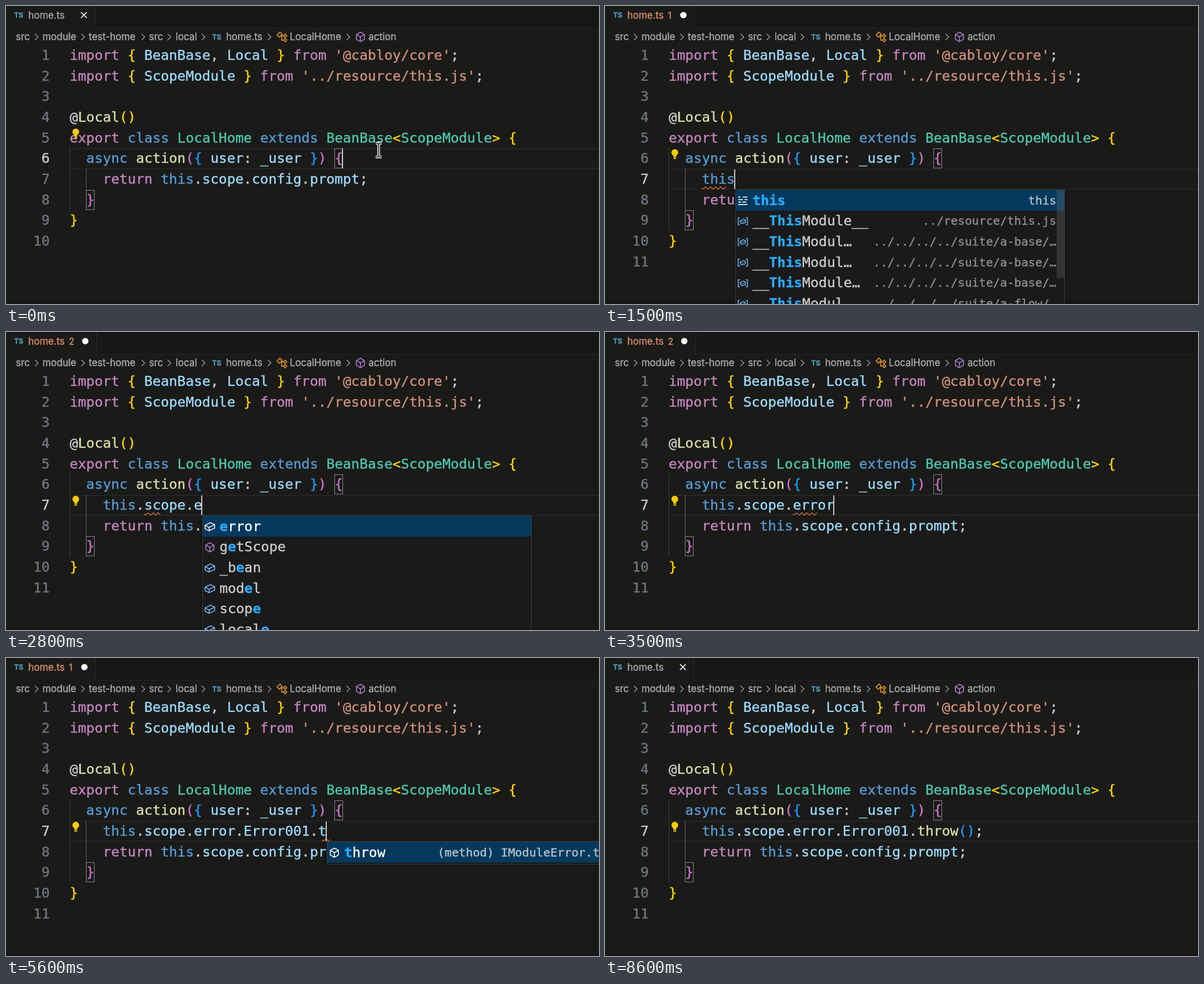
Write an HTML page with a canvas that moves like this. It is 1024 by 515 pixels and loops after 8700 ms.

```html
<!DOCTYPE html>
<html lang="en">
<head>
<meta charset="utf-8">
<title>Editor typing demo</title>
<style>
html, body { margin: 0; width: 100%; height: 100%; overflow: hidden; background: #1a1a18; }
canvas { display: block; }
</style>
</head>
<body>
<canvas id="stage" width="1024" height="515"></canvas>
<script>
const ctx = document.getElementById('stage').getContext('2d');
const LOOP = 8700, SIZE = 23.75, RATIO = 0.602, ADV = SIZE * RATIO;
const LEFT = 110, TOP = 67.5, ROW = 35.67;
const COLORS = {
  p: '#c586c0', y: '#ffd700', v: '#9cdcfe', s: '#ce9178', w: '#cccccc', k: '#569cd6',
  t: '#4ec9b0', f: '#dcdcaa', m: '#cc78c8', b: '#179fff'
};

// Each token starts with its colour key.
const HEAD = [
  'pimport |y{ |vBeanBase|w, |vLocal |y} |pfrom |s\'@cabloy/core\'|w;',
  'pimport |y{ |vScopeModule |y} |pfrom |s\'../resource/this.js\'|w;',
  '',
  'w@|fLocal|y()',
  'pexport |kclass |tLocalHome |kextends |tBeanBase|y<|tScopeModule|y> {',
  'w  |kasync |faction|m(|b{ |vuser|w: |v_user |b}|m) {'
];
const TAIL = ['w    |preturn |kthis|w.|vscope|w.|vconfig|w.|vprompt|w;', 'm  }', 'y}', ''];

// Suggestions: [icon, label, match start, detail]
const field = (label, at = 0, detail) => ['field', label, at, detail];
const method = (label, at = 0, detail) => ['method', label, at, detail];
const variable = (label, detail) => ['variable', label, 2, detail];
const far = name => `../../../../suite/${name}/…`;
const LISTS = {
  self: [
    ['keyword', 'this', 0, 'this'],
    variable('__ThisModule__', '../resource/this.js'),
    variable('__ThisModul…', far('a-base')), variable('__ThisModul…', far('a-base')),
    variable('__ThisModule…', far('a-base')), variable('__ThisModul…', far('a-flow'))
  ],
  bean: [method('action'), field('app'), field('bean'), field('ctx'), field('scope')],
  sc: [field('scope')],
  scope: [field('_bean'), field('config'), field('error'), method('getScope'), field('locale'), field('model')],
  e: [field('error'), method('getScope', 1), field('_bean', 2), field('model', 3), field('scope', 4), field('locale', 5)],
  err: [field('error')],
  code: [field('Error001', 0, '(property) Error001: IModule…')],
  call: [method('parseFail'), method('throw', 0, '(method) IModuleError.throw(…')],
  t: [method('throw', 0, '(method) IModuleError.throw(…')]
};

// Keystrokes: [time, text, list, matched letters, caret steps back]
const E = 'this.scope.error', C = E + '.Error001';
const KEYS = [
  [600, ''], [1000, 't', 'self', 1], [1100, 'th', 'self', 2], [1300, 'thi', 'self', 3], [1400, 'this', 'self', 4],
  [1700, 'this.', 'bean', 0], [1900, 'this.s', 'sc', 1], [2000, 'this.sc', 'sc', 2], [2200, 'this.scope'],
  [2400, 'this.scope.', 'scope', 0], [2800, 'this.scope.e', 'e', 1], [3000, 'this.scope.er', 'err', 2],
  [3200, 'this.scope.err', 'err', 3], [3500, E], [4000, E + '.', 'code', 0], [4900, C],
  [5200, C + '.', 'call', 0], [5500, C + '.t', 't', 1], [5900, C + '.throw'],
  [6400, C + '.throw()', null, 0, 1], [6700, C + '.throw()'], [7100, C + '.throw();']
];
// Diagnostics: [time, count, underlined column ranges]
const ERRORS = [
  [0, 0, []], [1400, 1, [[0, 3]]], [2200, 2, [[5, 7]]], [3300, 2, [[11, 14]]],
  [4300, 2, [[11, 16], [16.6, 17.5]]], [5000, 1, []], [5500, 1, [[26.5, 27.5]]], [6300, 0, []]
];
const BULB = [[0, 5], [600, 6], [1700, 7]];
const SAVED = 7500;

const latest = (list, t) => list.filter(item => item[0] <= t).pop();
const rowTop = line => TOP + (line - 1) * ROW;
const baseline = top => Math.floor(top + 26);
const colX = col => LEFT + col * ADV;

function rect(x, y, w, h, color) {
  ctx.fillStyle = color;
  ctx.fillRect(x, y, w, h);
}

function path(points, color, width = 1.4, closed = false) {
  ctx.beginPath();
  points.forEach(([x, y]) => ctx.lineTo(x, y));
  if (closed) ctx.closePath();
  ctx.strokeStyle = color;
  ctx.lineWidth = width;
  ctx.stroke();
}

function dot(x, y, r, color) {
  ctx.beginPath();
  ctx.arc(x, y, r, 0, Math.PI * 2);
  ctx.fillStyle = color;
  ctx.fill();
}

// A thin outline gives the glyphs a slightly heavier weight.
function glyphs(text, x, y, color) {
  ctx.fillStyle = ctx.strokeStyle = color;
  ctx.lineWidth = 0.4;
  ctx.fillText(text, x, y);
  ctx.strokeText(text, x, y);
}

function mono(text, x, y, color, size = SIZE, weight = '') {
  ctx.font = `${weight} ${size}px "DejaVu Sans Mono", monospace`;
  [...text].forEach((ch, i) => glyphs(ch, x + i * size * RATIO, y, color));
}

function label(text, x, y, color = '#a9a9a9', font = '16.6px') {
  ctx.font = `${font} Inter, sans-serif`;
  glyphs(text, x, y, color);
}

function codeLine(line, tokens) {
  let col = 0;
  for (const [color, text] of tokens) {
    mono(text, colX(col), baseline(rowTop(line)), color);
    col += text.length;
  }
}

const parse = source => source.split('|').map(s => [COLORS[s[0]], s.slice(1)]);

function typedTokens(text) {
  const parts = text.match(/\w+|[.;()]/g) || [];
  const color = (part, i) =>
    part === 'this' ? 'k' : /[.;]/.test(part) ? 'w' : /[()]/.test(part) ? 'b' : parts[i + 1] === '(' ? 'f' : 'v';
  return [['#cccccc', '    '], ...parts.map((part, i) => [COLORS[color(part, i)], part])];
}

function cube(x, y, w, h, color) {
  const q = h / 4;
  path([[x, y - 2 * q], [x + w, y - q], [x + w, y + q], [x, y + 2 * q], [x - w, y + q], [x - w, y - q]], color, 1.5, true);
  path([[x - w, y - q], [x, y], [x + w, y - q]], color, 1.5);
  path([[x, y], [x, y + 2 * q]], color, 1.5);
}

function icon(kind, x, y, selected) {
  const color = selected ? '#ffffff' : kind === 'method' ? '#b180d7' : '#75beff';
  if (kind === 'method') cube(x, y, 7, 16, color);
  if (kind === 'field') {
    path([[x - 8.3, y - 2.3], [x + 1.2, y - 7], [x + 8.3, y - 3.6], [x + 8.3, y + 2.4], [x - 1.2, y + 7], [x - 8.3, y + 3.6]], color, 1.5, true);
    path([[x - 8.3, y - 2.3], [x - 1.2, y + 1.2], [x + 8.3, y - 3.6]], color, 1.5);
    path([[x - 1.2, y + 1.2], [x - 1.2, y + 7]], color, 1.5);
  }
  if (kind === 'variable') {
    for (const d of [-1, 1]) path([[x + d * 5, y - 6], [x + d * 8, y - 6], [x + d * 8, y + 6], [x + d * 5, y + 6]], color);
    path([[x - 4.5, y - 1], [x + 1, y - 4], [x + 4.5, y - 2], [x + 4.5, y + 2], [x - 1, y + 4], [x - 4.5, y + 2]], color, 1.3, true);
    path([[x - 4.5, y - 1], [x - 1, y + 1], [x + 4.5, y - 2]], color, 1);
  }
  if (kind === 'keyword') {
    [4, 8, 5, 16].forEach((w, i) => rect(x - 8, y - 7 + i * 4.3, w, 1.6, color));
    rect(x, y - 7, 8, 1.6, color);
    rect(x + 3, y - 2.7, 5, 1.6, color);
    rect(x - 1, y + 1.6, 7, 1.6, color);
  }
}

function popup(name, matched, x) {
  const items = LISTS[name], y = 318, w = 568, h = items.length * ROW + 3.5;
  const scroll = name === 'self';
  ctx.shadowColor = 'rgba(0,0,0,.36)';
  ctx.shadowBlur = 8;
  rect(x, y, w, h, '#1a1a1a');
  ctx.shadowBlur = 0;
  rect(x, y, w, ROW, '#04395e');
  items.forEach(([kind, text, at, detail], i) => {
    const top = y + i * ROW, base = baseline(top), selected = i === 0;
    icon(kind, x + 13, top + 18.5, selected);
    [...text].forEach((ch, n) => {
      const hit = n >= at && n < at + matched;
      mono(ch, x + 29.7 + n * ADV, base, hit ? '#2aaaff' : selected ? '#ffffff' : '#cccccc', SIZE, hit ? 'bold' : '');
    });
    if (detail && (scroll || selected)) {
      const end = x + (scroll ? 554.5 : 544), size = 20.2;
      mono(detail, end - detail.length * size * RATIO, base - 1, selected ? '#b4c2cd' : '#8f8f8f', size);
    }
  });
  if (scroll) rect(x + w - 13, y, 13, 152, 'rgba(121,121,121,.27)');
  ctx.strokeStyle = '#3f3f3f';
  ctx.lineWidth = 1;
  ctx.strokeRect(x + 0.5, y - 0.5, w, h);
}

function tabBar(dirty, errors) {
  const shift = errors === 2 ? 3 : errors ? 1 : 0, color = errors ? '#d08968' : '#a0a0a0';
  const edge = 153 + shift;
  rect(edge, 0, 1024 - edge, 38, '#171717');
  rect(edge, 0, 1, 38, '#292929');
  rect(edge, 38, 1024 - edge, 1, '#252525');
  label('TS', 14, 20, '#519aba', 'bold 12px');
  label('home.ts', 38.5, 22, color);
  if (errors) label(errors, 108.5, 22, color, '15.5px');
  if (dirty) dot(134.5 + shift * 0.8, 15.7, 5.5, '#ffffff');
  else for (const d of [-1, 1]) path([[129.5, 15.7 - 5 * d], [139.5, 15.7 + 5 * d]], '#e4e4e4', 1.7);
}

function breadcrumbs() {
  const crumbs = [['src', 17], ['module', 63], ['test-home', 143], ['src', 247], ['local', 293],
    ['home.ts', 380], ['LocalHome', 490], ['action', 626]];
  crumbs.forEach(([text, x]) => label(text, x, 59));
  label('TS', 356, 58, '#519aba', 'bold 12px');
  [53, 133, 237, 282, 341, 455, 591].forEach(x => path([[x - 3, 48], [x + 2.5, 53.5], [x - 3, 59]], '#9a9a9a', 1.4));
  const orange = '#ee9d28';
  path([[468, 50], [473, 45], [477, 49], [472, 54]], orange, 1.5, true);
  path([[475, 51.5], [480, 51.5]], orange, 1.5);
  path([[476, 51.5], [476, 59], [480, 59]], orange, 1.5);
  for (const y of [51.5, 59]) path([[479.5, y], [482, y - 3], [485, y], [482, y + 3]], orange, 1.5, true);
  cube(612, 53.5, 7, 16.5, '#b180d7');
}

function bracketBox(line, col) {
  ctx.strokeStyle = '#888888';
  ctx.lineWidth = 1;
  ctx.strokeRect(Math.floor(colX(col)) + 0.5, Math.floor(rowTop(line)) + 1.5, 14, 33.5);
}

function squiggle(from, to) {
  const start = colX(4 + from), end = colX(4 + to), points = [];
  for (let x = start; x <= end; x++) points.push([x, 314.5 + 1.8 * Math.sin((x - start) * 0.72)]);
  path(points, '#d8743a', 1.3);
}

function bulb(line) {
  const x = 120.5, y = rowTop(line) + ROW / 2 - 10.5, color = '#ffcc00';
  dot(x, y, 5.8, color);
  rect(x - 2.5, y + 4, 5, 4, color);
  rect(x - 2.5, y + 9, 5, 2, color);
}

function pointer(x, y) {
  for (const [color, width] of [['#ffffff', 4.5], ['#111111', 1.6]]) {
    path([[x, y - 10], [x, y + 10]], color, width);
    for (const d of [-1, 1]) path([[x - 5, y + 12 * d], [x - 2, y + 12 * d], [x, y + 10 * d], [x + 2, y + 12 * d], [x + 5, y + 12 * d]], color, width);
  }
}

function draw(t) {
  const key = latest(KEYS, t);
  const [since, text, list, matched, back = 0] = key || [0, ''];
  const [, errors, marks] = latest(ERRORS, t);
  const extra = key ? 1 : 0, active = 6 + extra;
  const caretX = Math.floor(colX(key ? 4 + text.length - back : 33));

  rect(0, 0, 1024, 515, '#1a1a18');
  rect(0, 510, 1024, 5, '#171716');
  tabBar(key && t < SAVED, errors);
  breadcrumbs();

  rect(LEFT, rowTop(active), 914, 1.5, '#282828');
  rect(LEFT, rowTop(active + 1) - 1.5, 914, 1.5, '#282828');
  ctx.setLineDash([1, 1]);
  path([[110.5, Math.floor(rowTop(6))], [110.5, rowTop(9 + extra)]], '#666666', 1);
  ctx.setLineDash([]);
  path([[138.5, rowTop(7)], [138.5, rowTop(8 + extra)]], '#606060', 1);

  const lines = [...HEAD.map(parse), ...(key ? [typedTokens(text)] : []), ...TAIL.map(parse)];
  lines.forEach((tokens, i) => {
    const n = String(i + 1);
    mono(n, 75.5 - n.length * ADV, baseline(rowTop(i + 1)), i + 1 === active ? '#cccccc' : '#6e7681');
    codeLine(i + 1, tokens);
  });

  if (text.endsWith(')')) {
    bracketBox(7, 35);
    bracketBox(7, 36);
  } else {
    bracketBox(6, 32);
    bracketBox(8 + extra, 2);
  }
  marks.forEach(([from, to]) => squiggle(from, to));
  bulb(latest(BULB, t)[1]);
  if ((t - since) % 1000 < 500) rect(caretX - 1, rowTop(active) + 1, 2, 34, '#c8c8c8');
  if (list) popup(list, matched, caretX + 1);
  if (!key) pointer(643.5, 249);
}

const start = performance.now();
function frame() {
  draw((performance.now() - start) % LOOP);
  requestAnimationFrame(frame);
}
frame();
</script>
</body>
</html>
```
